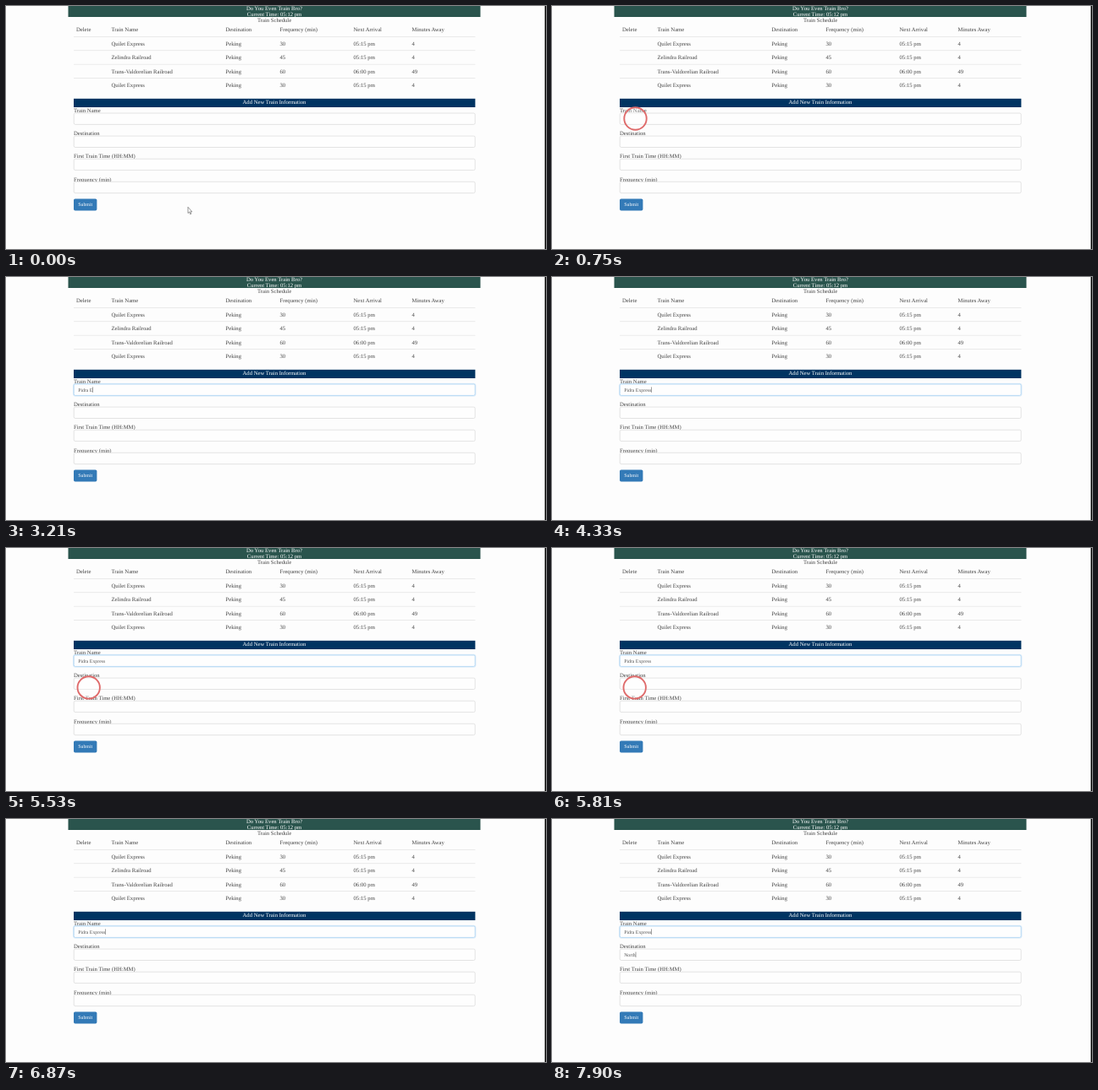
An HTML page for the animation above (8 s loop, 638 px wide and 288 px high).

```html
<!DOCTYPE html>
<html lang="en">
<head>
<meta charset="utf-8">
<title>Train schedule</title>
<style>
html, body { margin: 0; width: 100%; height: 100%; overflow: hidden; background: #fdfdfd; }
svg { display: block; width: 100%; height: 100%; }
text { font: 6.67px "Liberation Serif", "Times New Roman", serif; fill: #444; text-rendering: geometricPrecision; }
.mid { text-anchor: middle; }
.light { fill: #fff; }
.small { font-size: 5.9px; }
.typed { font-size: 5.8px; fill: #555; }
</style>
</head>
<body>
<svg id="stage" viewBox="0 0 638 288"></svg>
<script>
const LOOP = 8000;
const LEFT = 80, WIDTH = 474.4, VALUE_X = 85.2;
const stage = document.getElementById('stage');

function add(tag, attrs, content = '') {
  const el = document.createElementNS('http://www.w3.org/2000/svg', tag);
  for (const key in attrs) el.setAttribute(key, attrs[key]);
  el.textContent = content;
  return stage.appendChild(el);
}
const rect = (x, y, width, height, fill, more) => add('rect', { x, y, width, height, fill, ...more });
const text = (x, y, content, cls = '') => add('text', { x, y, class: cls }, content);

// Header and table
rect(73.5, 0, 487, 13, '#2a544d');
text(317, 5.4, 'Do You Even Train Bro?', 'mid light');
text(317, 12.1, 'Current Time: 05:12 pm', 'mid light');
text(317, 18.8, 'Train Schedule', 'mid');

const columns = [83, 124.5, 259.5, 323.5, 410.5, 479.5];
const rows = [
  'Delete|Train Name|Destination|Frequency (min)|Next Arrival|Minutes Away',
  '|Quilet Express|Peking|30|05:15 pm|4',
  '|Zelindra Railroad|Peking|45|05:15 pm|4',
  '|Trans-Valdorelian Railroad|Peking|60|06:00 pm|49',
  '|Quilet Express|Peking|30|05:15 pm|4'
];
rows.forEach((row, r) => {
  const y = 30.3 + r * 16.4;
  row.split('|').forEach((cell, c) => text(columns[c], y, cell));
  if (r) rect(LEFT, y - 10.7, WIDTH, 0.7, '#e3e3e3');
});

// Form
rect(LEFT, 109.8, WIDTH, 10.2, '#003462');
text(317, 115.6, 'Add New Train Information', 'mid light');

const labels = ['Train Name', 'Destination', 'First Train Time (HH:MM)', 'Frequency (min)'];
const fields = labels.map((label, i) => {
  const y = 126.8 + i * 27.1;
  text(LEFT, y - 0.6, label);
  const glow = rect(LEFT - 0.5, y - 0.5, WIDTH + 1, 14.8, 'none',
    { rx: 2, stroke: '#66afe9', 'stroke-opacity': 0.22, visibility: 'hidden' });
  const box = rect(LEFT + 0.2, y + 0.2, WIDTH - 0.4, 13.4, '#fefefe', { rx: 1.7, stroke: '#d2d2d2', 'stroke-width': 0.6 });
  const value = text(VALUE_X, y + 8.9, '', 'typed');
  const caret = rect(VALUE_X, y + 3.6, 0.5, 6.5, '#444', { visibility: 'hidden' });
  return { glow, box, value, caret };
});
rect(LEFT, 228.4, 27.4, 14.1, '#337ab7', { rx: 1.7 });
text(93.7, 237.4, 'Submit', 'mid light small');
rect(636.6, 0, 1.4, 288, '#000');

const ring = add('circle', { r: 13.2, fill: '#fff', 'fill-opacity': 0.3, stroke: '#df6b6b', 'stroke-width': 1.9 });
const pointer = add('path', {
  d: 'M0 0V7.2L1.6 5.8L2.7 8.5L3.8 8L2.7 5.5H4.8Z',
  fill: '#fff', stroke: '#555', 'stroke-width': 0.6
});

const show = (el, on) => el.setAttribute('visibility', on ? 'visible' : 'hidden');
const within = (t, from, to) => t >= from && t < to;
const typed = (word, t, from, pace) => word.slice(0, Math.max(0, Math.floor((t - from) / pace) + 1));

// The click ring stays for a moment, then fades.
const pulse = (t, from, to) => t < from ? 0 : Math.min(1, Math.max(0, (to - t) / 130));

function fill(field, content, caretOn) {
  field.value.textContent = content;
  const width = content ? field.value.getComputedTextLength() : 0;
  field.caret.setAttribute('x', VALUE_X + width);
  show(field.caret, caretOn);
}

function draw(t) {
  // The pointer rests briefly, then glides to the first field.
  const glide = t < 100 ? 0 : t;
  const x = 100 + 115 * Math.exp(-glide / 72);
  const y = 141 + 97.3 * Math.exp(-glide / 140);
  pointer.setAttribute('transform', `translate(${x} ${y})`);
  show(pointer, t < 750);

  ring.setAttribute('opacity', pulse(t, 750, 1090) + pulse(t, 5530, 5940));
  ring.setAttribute('transform', t < 5000 ? 'translate(98.5 133.5)' : 'translate(97.7 165.4)');

  const focused = t >= 960;
  show(fields[0].glow, focused);
  fields[0].box.setAttribute('stroke', focused ? '#8cc3ee' : '#d2d2d2');

  fill(fields[0], typed('Pidra Express', t, 1980, 195),
    t >= 1980 && !within(t, 4940, 5220) && !within(t, 5410, 5940));
  fill(fields[1], typed('North', t, 7380, 130), within(t, 6520, 6870) || t >= 7380);
}

const start = performance.now();
function tick(now) {
  draw(Math.max(0, now - start) % LOOP);
  requestAnimationFrame(tick);
}
draw(0);
requestAnimationFrame(tick);
</script>
</body>
</html>
```
